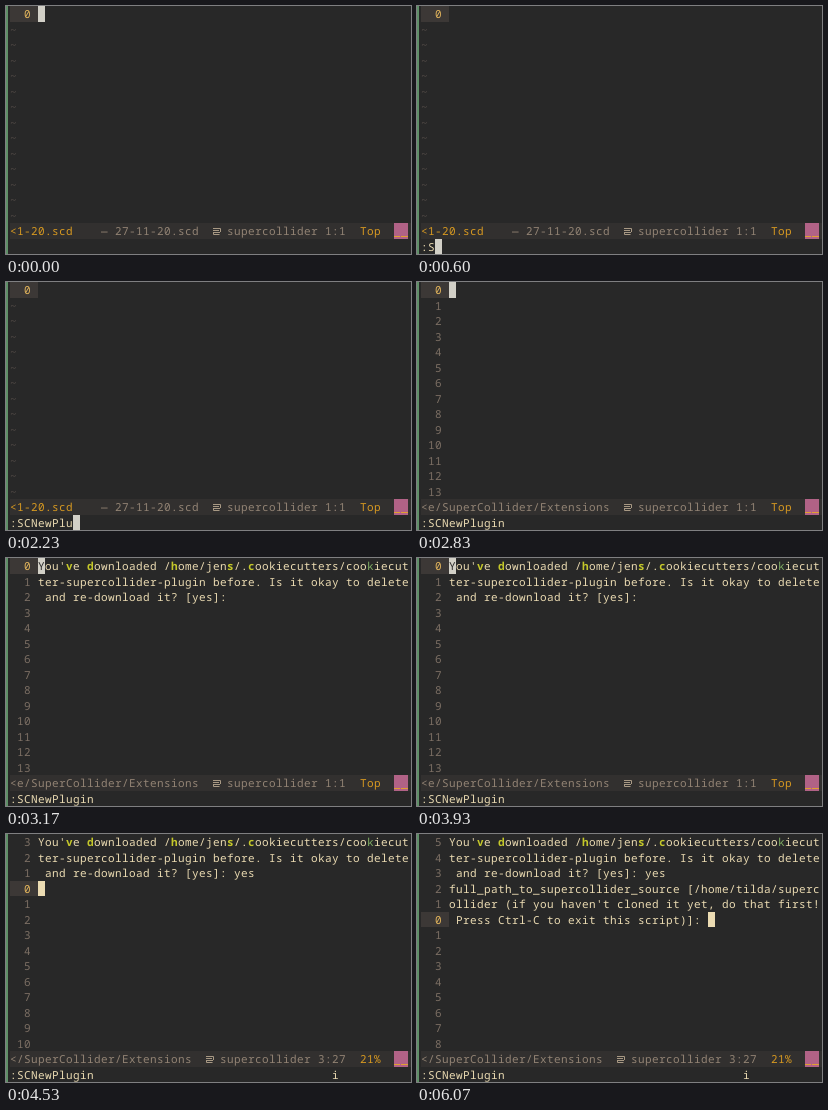
These frames come from a looping animation (405 by 248 pixels, 8000 ms). An HTML page:

```html
<!DOCTYPE html>
<html lang="en">
<head>
<meta charset="utf-8">
<title>Terminal session</title>
<style>
  html, body { margin: 0; width: 100%; height: 100%; overflow: hidden; background: #282828; }
  #screen {
    position: relative; width: 405px; height: 248px; overflow: hidden;
    background: #282828; color: #ebdbb2;
    font: 11px/17.5px "Noto Sans Mono", "DejaVu Sans Mono", monospace;
    letter-spacing: calc(7px - .6em);
    font-variant-ligatures: none; text-rendering: geometricPrecision;
  }
  #screen span { position: absolute; height: 15.5px; white-space: pre; }
  #screen b { font-weight: 700; color: #c5c82a; }
  #screen i { font-style: normal; color: #7fae63; }
  .edge { position: absolute; left: 0; top: 0; width: 2px; height: 248px; background: #5f8f68; }
  .bar { position: absolute; left: 4px; top: 217px; width: 401px; height: 15.5px; background: #32302f; }
  .badge { position: absolute; left: 388px; top: 217px; width: 14px; height: 15.5px; background: #b16286; }
  .badge::after {
    content: ""; position: absolute; left: 0; top: 13px; width: 14px; height: 1px;
    background: linear-gradient(90deg, #e0a030 6px, transparent 6px 7px, #e0a030 7px);
  }
  .icon { position: absolute; top: 222px; fill: none; stroke: #a89984; }
  .tilde { color: #504945; }
  .num { color: #7c6f64; }
  .current { width: 28px; background: #3c3836; color: #e3b55c; }
  .muted { color: #928374; }
  .accent { color: #d79921; }
  .block { width: 7px; background: #d2d0c7; color: #282828; }
  .insert { background: #ebdbb2; }
</style>
</head>
<body>
<div id="screen"></div>
<script>
const LOOP = 8000, CELL = 7, LINE = 15.5, LEFT = 4, GUTTER = 4;
const screenEl = document.getElementById("screen");

// Text is markup, so "<" is written as an entity.
const question = [
  "You'<b>v</b>e <b>d</b>ownloaded /<b>h</b>ome/jen<b>s</b>/.<b>c</b>ookiecutters/coo<i>k</i>iecut",
  "ter-supercollider-plugin before. Is it okay to delete",
  " and re-download it? [yes]: "
];
const answer = text => [...question.slice(0, 2), question[2] + text];
const sourcePrompt = [
  "full_path_to_supercollider_source [/home/tilda/superc",
  "ollider (if you haven't cloned it yet, do that first!",
  " Press Ctrl-C to exit this script)]: "
];

// Each step changes part of the state; cursor is [column, row, character].
const home = [GUTTER, 0, ""];
const steps = [[0, { lines: [], empty: true, command: "", row: 0, cursor: home,
                     path: "", shift: 0, position: "1:1", scroll: "Top", insert: false }]];
const at = (time, change) => steps.push([time, change]);

[430, 600, 670, 1230, 1600, 1670, 1870, 2030, 2230, 2300, 2470, 2670].forEach((time, n) =>
  at(time, { command: ":SCNewPlugin".slice(0, n + 1), cursor: [n + 1, 15, ""] }));

at(2830, { empty: false, cursor: home, path: "&lt;e/SuperCollider/Extensions" });
at(3170, { lines: question, cursor: [GUTTER, 0, "Y"] });
at(3470, { cursor: null });
at(3930, { cursor: [GUTTER, 0, "Y"] });
at(3970, { row: 2, cursor: [32, 2, ""], path: "&lt;/SuperCollider/Extensions",
           shift: 1, position: "3:27", scroll: "21%", insert: true });
[4270, 4330, 4500].forEach((time, n) =>
  at(time, { lines: answer("yes".slice(0, n + 1)), cursor: [33 + n, 2, ""] }));
at(4530, { row: 3, cursor: [GUTTER, 3, ""] });
at(6070, { lines: [...answer("yes"), ...sourcePrompt], row: 5, cursor: [41, 5, ""] });

const states = [];
for (const [time, change] of steps) states.push({ ...states.at(-1), ...change, time });

const put = (col, row, text, style = "") =>
  `<span class="${style}" style="left:${LEFT + col * CELL}px;top:${row * LINE}px">${text}</span>`;

function gutter(s) {
  let html = "";
  for (let row = 0; row < 14; row++) {
    const label = String(Math.abs(row - s.row)).padStart(3);
    if (row === s.row) html += put(0, row, label, "current");
    else html += s.empty ? put(0, row, "~", "tilde") : put(0, row, label, "num");
  }
  return html;
}

function status(s) {
  const name = s.path
    ? put(0, 14, s.path, "muted")
    : put(0, 14, "&lt;1-20.scd", "accent") + put(13, 14, "— 27-11-20.scd", "muted");
  const icon = `<svg class="icon" style="left:${206 - s.shift * CELL}px" width="9" height="8">
    <path d="M1 .5H8.5V4M1 2.5H7M1 4.5H8M1.5 4.5V6.5H7.5"/></svg>`;
  return `<div class="bar"></div>${name}${icon}` +
    put(31 - s.shift, 14, "supercollider " + s.position, "muted") +
    put(50, 14, s.scroll, "accent") + `<div class="badge"></div>`;
}

function render(s) {
  let html = `<div class="edge"></div>` + gutter(s) + status(s);
  s.lines.forEach((line, row) => html += put(GUTTER, row, line));
  html += put(0, 15, s.command);
  if (s.insert) html += put(46, 15, "i");
  if (s.cursor) html += put(...s.cursor, s.insert ? "block insert" : "block");
  screenEl.innerHTML = html;
}

let shown;
function tick() {
  const time = performance.now() % LOOP;
  const state = states.findLast(s => s.time <= time);
  if (state !== shown) render(shown = state);
  requestAnimationFrame(tick);
}
tick();
</script>
</body>
</html>
```
